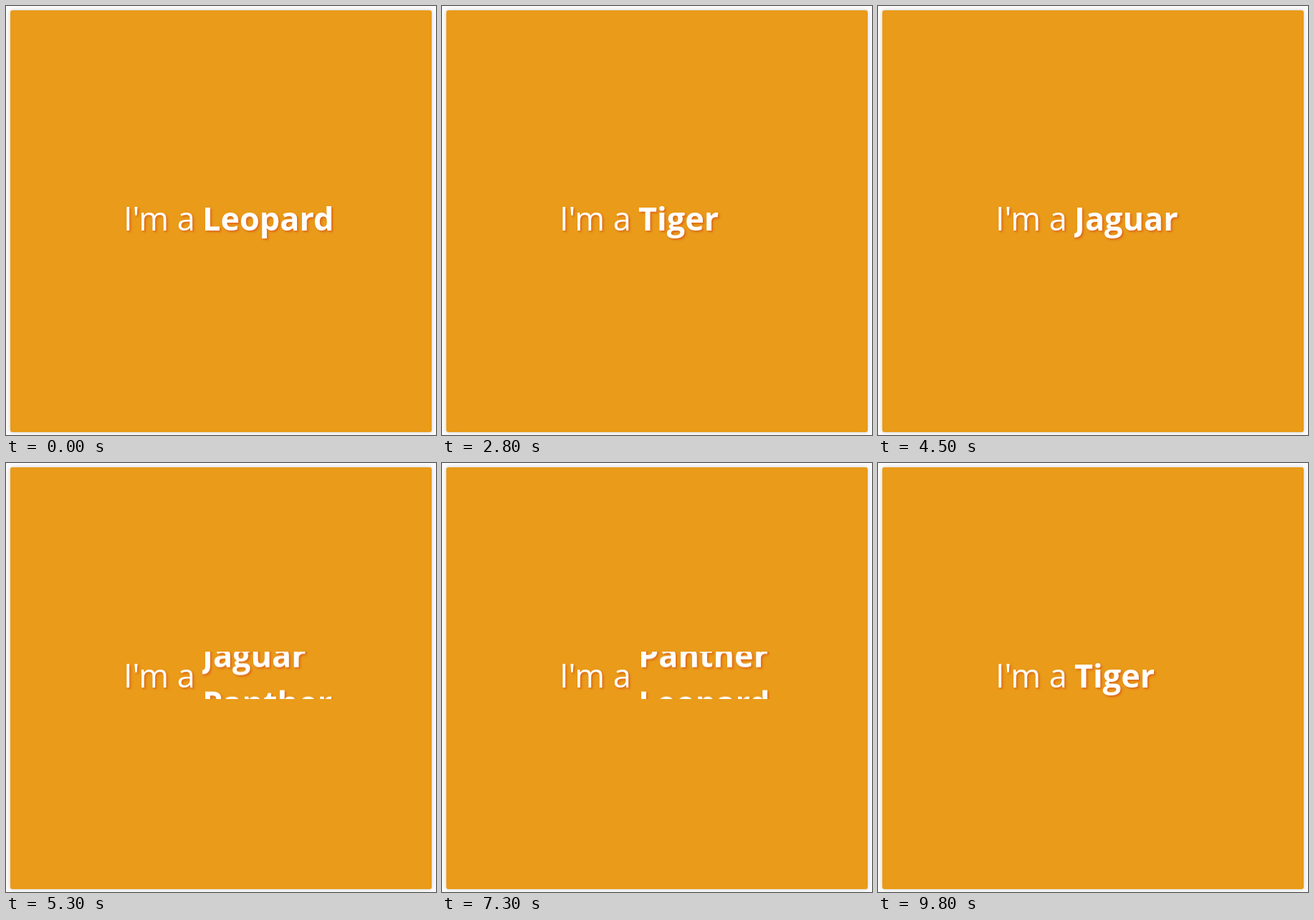
Write an HTML page that moves like this. It is 600 px wide and 598 px high and loops after 9.9 s.

```html
<!DOCTYPE html>
<html lang="en">
<head>
<meta charset="utf-8">
<title>Rotating words</title>
<style>
  html, body { margin: 0; width: 100%; height: 100%; overflow: hidden; background: #fbfbfb; }
  .panel {
    position: absolute; left: 6px; top: 6px; width: 588px; height: 587.5px;
    border-radius: 3px; background: #e99b19;
    box-shadow: 0 0 5px rgba(0, 0, 0, .2);
  }
  .lead, .window {
    position: absolute; top: 257px; height: 66px;
    font: 400 45px/66px "Open Sans", sans-serif;
    color: #fff; white-space: pre;
    text-shadow: 2px 2px 3px rgba(216, 88, 28, .75);
  }
  .lead { left: 158px; }
  .window { left: 268px; overflow: hidden; font-weight: 700; }
  .word { height: 66px; }
</style>
</head>
<body>
<div class="panel">
  <div class="lead">I'm a</div>
  <div class="window"><div id="reel"></div></div>
</div>
<script>
  const LOOP = 9900, LINE = 66, FIRST = 1197, PERIOD = 2000, SLIDE = 400;
  const words = ["Leopard", "Tiger", "Jaguar", "Panther", "Leopard", "Tiger"];
  const reel = document.getElementById("reel");

  for (const text of words) {
    const word = document.createElement("div");
    word.className = "word";
    word.textContent = text;
    reel.append(word);
  }

  const key = (time, row, easing = "linear") => ({
    offset: time / LOOP,
    transform: `translateY(${-row * LINE}px)`,
    easing
  });

  const last = words.length - 1;
  const steps = [key(0, 0)];
  for (let row = 0; row < last; row++) {
    const start = FIRST + row * PERIOD;
    steps.push(key(start, row, "ease"), key(start + SLIDE, row + 1));
  }
  steps.push(key(LOOP, last));

  reel.animate(steps, { duration: LOOP, iterations: Infinity });
</script>
</body>
</html>
```
